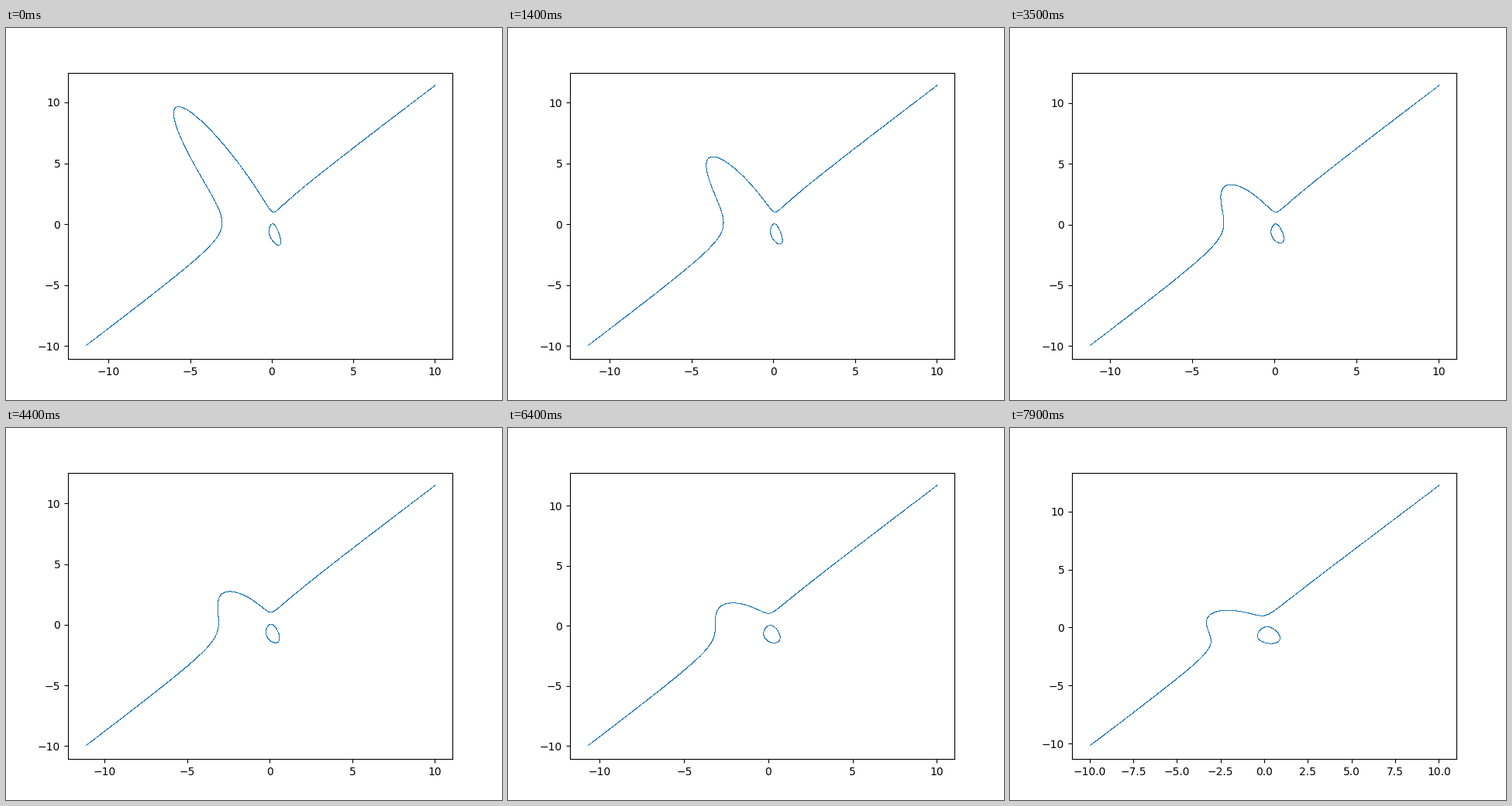
Write a matplotlib script that moves like this. It is 640 px wide and 480 px high and loops after 8000 ms.

```python
import numpy as np
import matplotlib.pyplot as plt
from matplotlib.animation import FuncAnimation

FRAMES = 80
INTERVAL = 100
GRID = np.linspace(-10, 10, 1000)


def real_roots(a, b, c, d):
    """Real roots of a*z^3 + b*z^2 + c*z + d for each point of GRID."""
    comp = np.zeros((GRID.size, 3, 3))
    comp[:, 0, 0] = -b / a
    comp[:, 0, 1] = -c / a
    comp[:, 0, 2] = -d / a
    comp[:, 1, 0] = comp[:, 2, 1] = 1
    roots = np.linalg.eigvals(comp)
    real = np.abs(roots.imag) < 1e-9
    at = np.broadcast_to(GRID[:, None], roots.shape)
    return at[real], roots.real[real]


def curve(t):
    """Points of t x^3 + 3t x^2 - (t+3) x y^2 + (2/t) x^2 y - 3xy + 2x
    + 3y^3 + y^2 - 4y = 0, solved along both axes."""
    g = GRID
    x1, y1 = real_roots(3, 1 - (t + 3) * g, 2 * g**2 / t - 3 * g - 4,
                        t * g**3 + 3 * t * g**2 + 2 * g)
    y2, x2 = real_roots(t, 3 * t + 2 * g / t, 2 - 3 * g - (t + 3) * g**2,
                        3 * g**3 + g**2 - 4 * g)
    return np.concatenate([x1, x2]), np.concatenate([y1, y2])


fig, ax = plt.subplots(figsize=(6.4, 4.8), dpi=100)


def draw(i):
    ax.clear()
    x, y = curve(-10 + 0.1 * i)
    ax.plot(x, y, ",", color="#1f77b4")


anim = FuncAnimation(fig, draw, frames=FRAMES, interval=INTERVAL,
                     init_func=lambda: None, repeat=True, repeat_delay=0)
plt.show()
```
